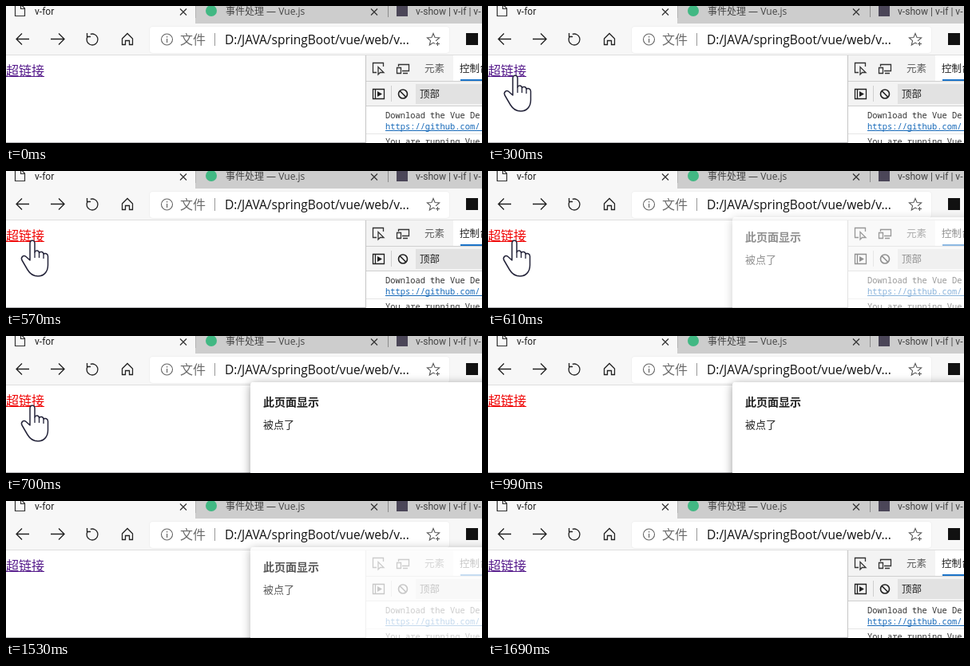
Write an HTML page with a canvas that moves like this. It is 596 px wide and 172 px high and loops after 3410 ms.

```html
<!DOCTYPE html>
<html lang="zh-CN">
<head>
<meta charset="utf-8">
<style>
html, body { margin: 0; width: 100%; height: 100%; overflow: hidden; background: #fff; }
canvas { display: block; width: 596px; height: 172px; }
</style>
</head>
<body>
<canvas id="stage" width="596" height="172"></canvas>
<script>
const ctx = document.getElementById('stage').getContext('2d');
const LOOP = 3410;
const CJK = '"Noto Sans CJK SC", "Noto Sans CJK", sans-serif';
const UI = 'Roboto, ' + CJK;
const HUMAN = '"Open Sans", ' + CJK;
const MONO = '"Noto Sans Mono", monospace';

// [start, shape, x, y]; each pose holds until the next one
const pointerSteps = [
  [0, null], [70, 'arrow', 150, 148], [150, 'arrow', 84, 116],
  [220, 'hand', 25, 88], [300, 'hand', 20, 87], [460, 'hand', 19, 87],
  [850, 'arrow', 190, 122], [920, 'arrow', 572, 150], [990, null]
];
const linkSteps = [[0, '#551a8b'], [460, '#f00000'], [1450, '#551a8b']];
const dialogSteps = [[0, 0], [610, 0.5], [700, 1], [1530, 0.75], [1610, 0.3], [1690, 0]];

const at = (steps, t) => steps.filter(step => step[0] <= t).pop();

function box(x, y, w, h, color) {
  ctx.fillStyle = color;
  ctx.fillRect(x, y, w, h);
}

function rounded(x, y, w, h, r, color) {
  ctx.fillStyle = color;
  ctx.beginPath();
  ctx.roundRect(x, y, w, h, r);
  ctx.fill();
}

function text(str, x, y, size, color, family = UI, weight = 400) {
  ctx.font = `${weight} ${size}px ${family}`;
  ctx.fillStyle = color;
  ctx.fillText(str, x, y);
  return ctx.measureText(str).width;
}

function stroke(d, color = '#222', width = 1.2) {
  ctx.strokeStyle = color;
  ctx.lineWidth = width;
  ctx.stroke(new Path2D(d));
}

function ring(x, y, r, color, width, from = 0, to = Math.PI * 2) {
  ctx.strokeStyle = color;
  ctx.lineWidth = width;
  ctx.beginPath();
  ctx.arc(x, y, r, from, to);
  ctx.stroke();
}

function star(x, y, r) {
  ctx.beginPath();
  for (let i = 0; i < 10; i++) {
    const a = i * Math.PI / 5 - Math.PI / 2;
    const d = i % 2 ? r * 0.45 : r;
    ctx.lineTo(x + d * Math.cos(a), y + d * Math.sin(a));
  }
  ctx.closePath();
  ctx.strokeStyle = '#555';
  ctx.lineWidth = 1.1;
  ctx.stroke();
}

function drawTabs() {
  box(0, 0, 596, 62, '#f7f7f7');
  box(237, 0, 359, 15, '#cdcdcd');
  box(237, 0, 1, 15, '#b4b4b4');
  stroke('M11.5 -2V12.5H23.5V3L18.5 -2M18.5 -1V3.5H23', '#333');
  text('v-for', 36, 11, 12, '#222');
  for (const x of [222, 461]) stroke(`M${x - 4} 3.5l8 8m0 -8l-8 8`, '#333');
  ctx.fillStyle = '#41b883';
  ctx.beginPath();
  ctx.arc(257, 6, 7, 0, Math.PI * 2);
  ctx.fill();
  text('事件处理 — Vue.js', 275, 11, 12, '#444', HUMAN);
  box(478, 0, 1, 14, '#8c8c8c');
  box(489, 0, 14, 13, '#4b4658');
  text('v-show | v-if | v-', 513, 11, 12.1, '#444');
}

function drawToolbar() {
  box(237, 15, 359, 7, '#cdcdcd');
  box(0, 22, 596, 40, '#f7f7f7');
  stroke('M29 41.5H13M20 34.5L13 41.5L20 48.5', '#222', 1.3);
  stroke('M56 41.5H73M66 34.5L73 41.5L66 48.5', '#222', 1.3);
  ring(108, 42, 7, '#222', 1.3, -1.9, 3.7);
  stroke('M101.5 34V38.5H106', '#222', 1.3);
  stroke('M145.5 41L152 34.5L158.5 41V48.5H154.5V43.5H149.5V48.5H145.5Z', '#222', 1.3);
  rounded(179, 25, 377, 35, 5, '#f0f0f0');
  rounded(180, 26, 375, 33, 4, '#fff');
  ring(201.5, 42, 7, '#666', 1.1);
  box(201, 41, 1.2, 5, '#666');
  box(201, 38, 1.2, 1.5, '#666');
  text('文件', 218, 48, 16, '#6b6b6b', CJK);
  box(261, 34, 1, 16, '#999');
  text('D:/JAVA/springBoot/vue/web/v...', 274, 48, 15.5, '#111', HUMAN);
  star(535, 42.5, 8);
  box(537, 44, 8, 7, '#fff');
  stroke('M538 47.5h5m-2.5 -2.5v5', '#555', 1.1);
  box(576, 34, 15, 15, '#111');
  box(0, 61, 596, 1, '#dedede');
}

function drawPage(linkColor) {
  box(0, 62, 596, 110, '#fff');
  const w = text('超链接', 0, 87, 16, linkColor, CJK);
  box(0, 88, w, 1, linkColor);
  box(0, 171, 451, 1, '#b5b5b8');
}

function drawDevtools() {
  box(451, 62, 145, 64, '#f3f3f3');
  box(560, 62, 36, 32, '#fff');
  box(451, 94, 145, 1, '#cfcfcf');
  box(569, 92, 27, 2, '#1a73c8');
  box(451, 125, 145, 1, '#cfcfcf');

  stroke('M464 83.5H459.5V71.5H472.5V76', '#333', 1.3);
  stroke('M466 76.5V86L468.5 83.5H473Z', '#333', 1.3);
  stroke('M491.5 76V73.5H504.5V81.5H496M489.5 77.5H494.5V84.5H489.5ZM497 84.5H503', '#333', 1.3);
  text('元素', 524, 83, 12.5, '#5a5a5a', CJK);
  text('控制台', 568, 83, 12.5, '#222', CJK);

  stroke('M459.5 104.5H473.5V116.5H459.5ZM462.5 104V117', '#222', 1.3);
  ctx.fillStyle = '#222';
  ctx.fill(new Path2D('M465 107L471 110.5L465 114Z'));
  box(482, 100, 1, 20, '#cfcfcf');
  ring(497, 110.5, 5.5, '#222', 1.6);
  stroke('M493 106.5L501 114.5', '#222', 1.6);
  box(513, 98, 83, 25, '#e2e2e2');
  text('顶部', 518, 115, 12.5, '#222', CJK);

  text('Download the Vue De', 475, 141, 10.4, '#333', MONO);
  const w = text('https://github.com/', 475, 155, 10.4, '#1568b8', MONO);
  box(475, 156, w + 4, 1, '#1568b8');
  box(451, 160, 145, 1, '#e6e6e6');
  text('You are running Vue', 475, 174, 10.4, '#333', MONO);
  box(450, 62, 1, 110, '#c6c6c6');
}

function drawDialog(alpha) {
  if (!alpha) return;
  ctx.save();
  ctx.globalAlpha = alpha;

  // the shadow stays outside the panel, so a half-faded panel is not darkened
  ctx.save();
  const outside = new Path2D();
  outside.rect(0, 0, 596, 172);
  outside.roundRect(306, 58, 330, 160, 4);
  ctx.clip(outside, 'evenodd');
  ctx.shadowColor = 'rgba(0,0,0,.4)';
  ctx.shadowBlur = 12;
  ctx.shadowOffsetY = 2;
  rounded(306, 58, 330, 160, 4, '#fff');
  ctx.restore();

  rounded(306, 58, 330, 160, 4, '#fff');
  text('此页面显示', 322, 88, 14, '#222', CJK, 700);
  text('被点了', 322, 116, 13, '#222', CJK);
  ctx.restore();
}

const pointerShapes = {
  hand: new Path2D('M11 25V4C11 -1 17 -1 17 4V15C18 12 22.5 12.5 22.5 16' +
    'C23.5 13.5 28 14 28 17.5C29.5 15.5 33.5 16.5 33.5 20V31' +
    'C33.5 40 28 45 21 45C14.5 45 11 42 8 37L1 25' +
    'C-1 21 3 18 6 20.5Z'),
  arrow: new Path2D('M0 0V28L6.5 22L11 32L15.5 30L11 20.5H20Z')
};

function drawPointer([, shape, x, y]) {
  if (!shape) return;
  ctx.save();
  ctx.translate(x, y);
  ctx.lineJoin = 'round';
  ctx.fillStyle = '#fff';
  ctx.fill(pointerShapes[shape]);
  ctx.strokeStyle = '#24243a';
  ctx.lineWidth = 1.5;
  ctx.stroke(pointerShapes[shape]);
  if (shape === 'hand') stroke('M17 15V22M22.5 16V22M28 18V23', '#24243a', 1.3);
  ctx.restore();
}

function frame() {
  const t = performance.now() % LOOP;
  drawTabs();
  drawToolbar();
  drawPage(at(linkSteps, t)[1]);
  drawDevtools();
  drawDialog(at(dialogSteps, t)[1]);
  drawPointer(at(pointerSteps, t));
  requestAnimationFrame(frame);
}

frame();
</script>
</body>
</html>
```
